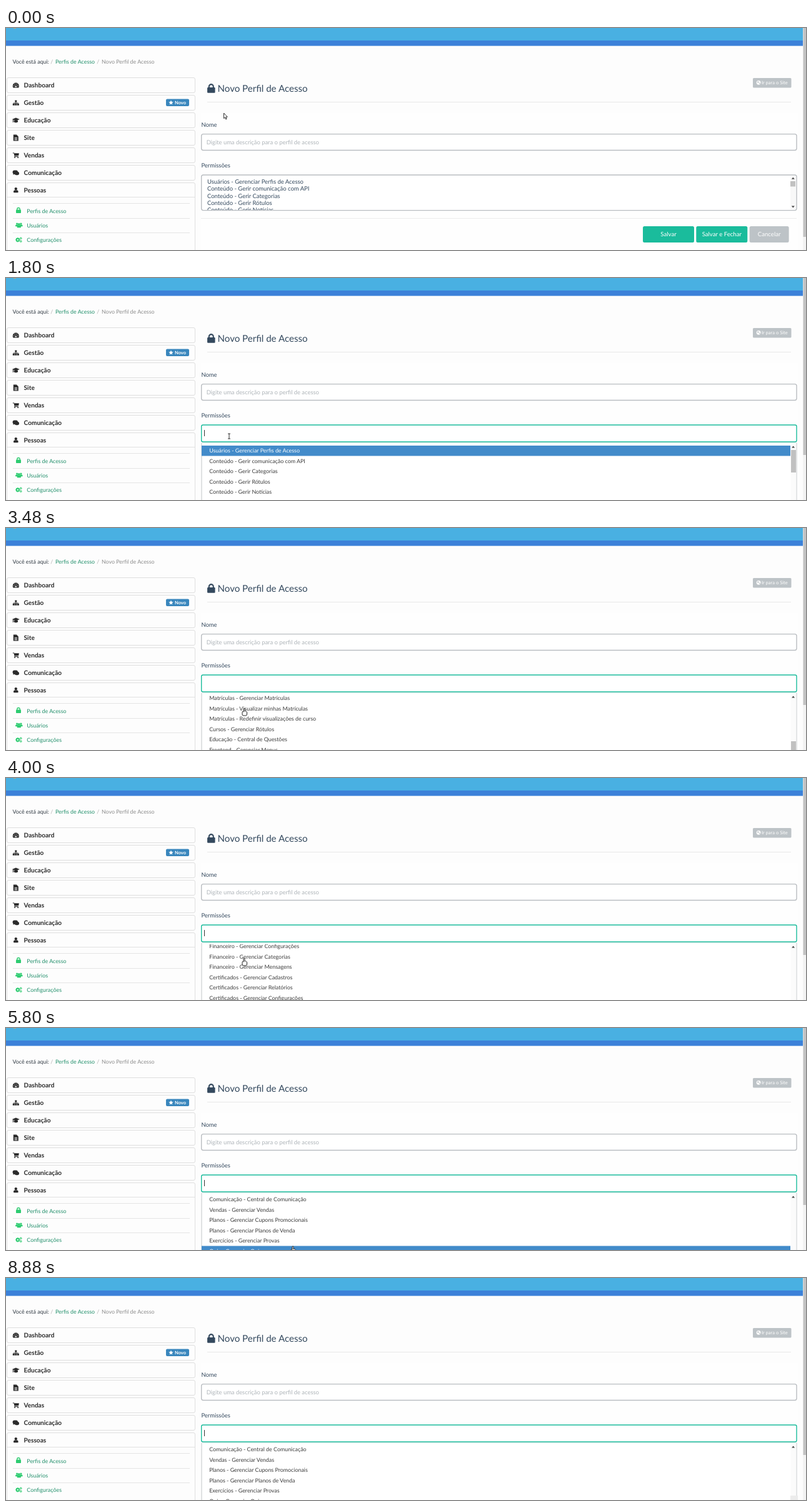
An HTML page with a canvas for the animation above (9290 ms loop, 1280x355 px).

```html
<!DOCTYPE html>
<html lang="pt">
<head>
<meta charset="utf-8">
<style>
html, body { margin: 0; width: 100%; height: 100%; overflow: hidden; background: #fdfdfd; }
canvas { display: block; }
</style>
</head>
<body>
<canvas id="stage" width="1280" height="355"></canvas>
<script>
const ctx = document.getElementById('stage').getContext('2d');
const LOOP = 9290, ROW = 16.5, LIST_TOP = 268, END_SCROLL = 942.5;
const CONVERTED = 270, OPENED = 1650, HOVERED = 2210, SCROLLED = 4280, RESUMED = 4730, LEFT = 7890;
const PAPER = '#fdfdfd', DARK = '#2b2b2b', NAVY = '#34495e', GREEN = '#23906c';
const LIME = '#2ecc71', TEAL = '#1abc9c', GRAY = '#bdc3c7', BORDER = '#b9bdc1', THUMB = '#c1c1c1';

// Each pointer move starts where the previous one ended.
const moves = [
  { from: 540, to: 1800, x: 357, y: 253 },
  { from: 1800, to: 2210, x: 381, y: 288.5 },
  { from: 4280, to: 4590, x: 438, y: 305 },
  { from: 5200, to: 5800, x: 459, y: 349 },
  { from: 6130, to: 6330, x: 462, y: 385 },
  { from: 7000, to: 7340, x: 1240, y: 349 },
  { from: 7420, to: LEFT, x: 1268, y: 390 }
];

function buildPermissions() {
  const list = ['Usuários - Gerenciar Perfis de Acesso', 'Conteúdo - Gerir comunicação com API'];
  for (const item of ['Categorias', 'Rótulos', 'Notícias', 'Páginas', 'Banners', 'Eventos', 'Galerias', 'Arquivos'])
    list.push('Conteúdo - Gerir ' + item);
  const items = ['Cadastros', 'Relatórios', 'Configurações', 'Categorias', 'Mensagens'];
  const fill = (areas, count) => {
    for (let i = 0; i < count; i++) list.push(areas[Math.floor(i / 5)] + ' - Gerenciar ' + items[i % 5]);
  };
  fill(['Usuários', 'Cursos', 'Turmas'], 14);
  list.push('Matrículas - Gerenciar Matrículas', 'Matrículas - Visualizar minhas Matrículas',
    'Matrículas - Redefinir visualizações de curso', 'Cursos - Gerenciar Rótulos',
    'Educação - Central de Questões', 'Frontend - Gerenciar Menus');
  fill(['Frontend', 'Site', 'Financeiro', 'Certificados', 'Alunos', 'Fóruns'], 27);
  list.push('Comunicação - Central de Comunicação', 'Vendas - Gerenciar Vendas',
    'Planos - Gerenciar Cupons Promocionais', 'Planos - Gerenciar Planos de Venda',
    'Exercícios - Gerenciar Provas', 'Quiz - Gerenciar Quizzes');
  return list;
}
const permissions = buildPermissions();

const progress = (t, from, to) => Math.min(1, Math.max(0, (t - from) / (to - from)));
const smooth = k => k * k * (3 - 2 * k);

function pointerAt(t) {
  let x = 348.5, y = 136;
  for (const move of moves) {
    const k = smooth(progress(t, move.from, move.to));
    x += (move.x - x) * k;
    y += (move.y - y) * k;
  }
  return [x, y];
}

// Two turns of the wheel, 100 px per notch.
function scrollAt(t) {
  const notches = Math.floor(4 * progress(t, 2470, 3350)) + Math.floor(6 * progress(t, 3500, SCROLLED));
  return Math.min(END_SCROLL, 100 * notches);
}

function activeRow(t, x, y, scroll) {
  if (t >= HOVERED && t < SCROLLED) return 1;
  if (t < RESUMED) return Math.floor(scroll / ROW);
  return x < 1255 && y < 365 ? Math.floor((y - LIST_TOP + scroll) / ROW) : -1;
}

function text(str, x, centerY, size, color, weight = 400, align = 'left') {
  ctx.font = `${weight} ${size}px Lato, sans-serif`;
  ctx.textAlign = align;
  ctx.fillStyle = color;
  ctx.fillText(str, x, centerY + size * 0.36);
}
function rect(x, y, w, h, color) {
  ctx.fillStyle = color;
  ctx.fillRect(x, y, w, h);
}
function box(x, y, w, h, r, fill, stroke, line = 1) {
  ctx.beginPath();
  ctx.roundRect(x, y, w, h, r);
  paint(fill, stroke, line);
}
function paint(fill, stroke, line = 1) {
  if (fill) { ctx.fillStyle = fill; ctx.fill(); }
  if (stroke) { ctx.strokeStyle = stroke; ctx.lineWidth = line; ctx.stroke(); }
}
function dot(x, y, r, color) {
  ctx.beginPath();
  ctx.arc(x, y, r, 0, Math.PI * 2);
  paint(color);
}
function ring(x, y, r, line, color, from = 0) {
  ctx.beginPath();
  ctx.arc(x, y, r, from, Math.PI * 2);
  paint(null, color, line);
}
function poly(points, fill, stroke) {
  ctx.beginPath();
  points.forEach(([x, y]) => ctx.lineTo(x, y));
  ctx.closePath();
  paint(fill, stroke);
}
function clipped(x, y, w, h, content) {
  ctx.save();
  ctx.beginPath();
  ctx.rect(x, y, w, h);
  ctx.clip();
  content();
  ctx.restore();
}
function at(x, y, scale, content) {
  ctx.save();
  ctx.translate(x, y);
  ctx.scale(scale, scale);
  content();
  ctx.restore();
}
function triangle(x, y, dir) {
  poly([[x - 2.5, y + 1.2 * dir], [x + 2.5, y + 1.2 * dir], [x, y - 1.8 * dir]], '#444');
}

// Icons are drawn around the origin.
const lock = color => {
  box(-5, -1, 10, 7, 1, color);
  ring(0, -2, 2.8, 1.8, color, Math.PI);
  for (const x of [-2.8, 2.8]) rect(x - 0.9, -2, 1.8, 2, color);
};
const person = color => {
  dot(0, -2.2, 2.2, color);
  box(-3.8, 0, 7.6, 4, [2.5, 2.5, 1, 1], color);
};
const gear = color => {
  for (let a = 0; a < 8; a++) dot(3 * Math.cos(a * Math.PI / 4), 3 * Math.sin(a * Math.PI / 4), 0.9, color);
  ring(0, 0, 2.1, 1.8, color);
};
const star = color => poly(Array.from({ length: 10 }, (_, i) => {
  const a = i * Math.PI / 5 - Math.PI / 2, r = i % 2 ? 1.8 : 3.9;
  return [r * Math.cos(a), r * Math.sin(a)];
}), color);
const globe = () => {
  dot(0, 0, 3.4, '#fff');
  dot(-0.9, -0.8, 1.2, GRAY);
  dot(1.6, 1.2, 0.9, GRAY);
};
const gauge = () => {
  box(-5, -4, 10, 8, [5, 5, 1.5, 1.5], DARK);
  for (let i = 0; i < 4; i++) dot(-3 * Math.cos(i * Math.PI / 3), 1 - 3.2 * Math.sin(i * Math.PI / 3), 0.7, PAPER);
  dot(0, 1.8, 1.2, PAPER);
};
const sitemap = () => {
  rect(-1.5, -4, 3, 3, DARK);
  rect(-0.5, -1, 1, 2.2, DARK);
  rect(-4, 0, 8, 1, DARK);
  for (let x = -5; x < 5; x += 3.5) rect(x, 1.2, 3, 3, DARK);
};
const cap = () => {
  poly([[-6, -1.5], [0, -4], [6, -1.5], [0, 1]], DARK);
  box(-3.2, 0.3, 6.4, 3.4, [0, 0, 2, 2], DARK);
  rect(-5, -1, 1, 4.5, DARK);
};
const sheet = () => {
  poly([[-4, -5], [1, -5], [4, -2], [4, 5], [-4, 5]], DARK);
  for (let y = -0.4; y < 4; y += 1.7) rect(-2.2, y, 4.4, 0.8, PAPER);
};
const cart = () => {
  rect(-5, -4, 2.4, 1, DARK);
  poly([[-3.3, -3.2], [5, -3.2], [4.4, 0.5], [-2.4, 1.2]], DARK);
  rect(-2.5, 1.5, 6.5, 1, DARK);
  for (const x of [-1.7, 3.3]) dot(x, 3.6, 1, DARK);
};
const chat = () => {
  box(-2, -1.5, 7.2, 5.4, 2.7, DARK);
  box(-5.2, -3.8, 8.4, 5.8, 2.9, DARK);
  poly([[-4, 1], [-4.4, 3.4], [-1, 1.8]], DARK);
};
const menu = { Dashboard: gauge, Gestão: sitemap, Educação: cap, Site: sheet, Vendas: cart,
  Comunicação: chat, Pessoas: () => person(DARK) };

function drawSidebar() {
  Object.entries(menu).forEach(([label, icon], i) => {
    const y = 91.3 + 27.95 * i, height = label === 'Pessoas' ? 140 : 24;
    box(1.5, Math.round(y - 12) + 0.5, 301, height, 2.5, PAPER, '#dedede');
    at(15.8, y + 0.3, 1, icon);
    text(label, 28.6, y, 10.1, DARK, 700);
  });
  rect(2, 270, 300, 1, '#e2e2e2');
  box(256, 113.5, 37, 11.5, 2, '#3a87bd');
  at(264, 119.4, 1, () => star('#fff'));
  text('Novo', 270, 119.3, 7.5, '#fff', 700);

  ['Perfis de Acesso', 'Usuários', 'Configurações'].forEach((label, i) => {
    const y = 292.3 + 23.2 * i;
    rect(11, Math.round(y - 12), 283, 1, '#e4e4e4');
    text(label, 33.3, y, 8.9, GREEN);
  });
  at(20, 291.3, 0.8, () => lock(LIME));
  for (const dx of [-3.2, 3.2, 0]) at(20.8 + dx, dx ? 314.5 : 315.8, dx ? 0.7 : 0.85, () => person(LIME));
  at(18.8, 338.7, 0.95, () => gear(LIME));
  for (const dy of [-2.4, 2.4]) at(23.8, 338.7 + dy, 0.5, () => gear(LIME));
}

function drawHeader() {
  rect(0, 0, 1275, 20, '#49b0e2');
  rect(0, 20, 1275, 8.6, '#3c81d9');
  rect(12, 0, 4, 1, '#b9a57c');
  text('Você está aqui:', 10.4, 53.8, 8.85, '#333c45');
  text('/', 71.3, 53.8, 8.85, '#aaa');
  text('Perfis de Acesso', 79, 53.8, 8.85, GREEN);
  text('/', 145.3, 53.8, 8.85, '#aaa');
  text('Novo Perfil de Acesso', 153, 53.8, 8.85, '#8c8c8c');

  at(328.3, 96.2, 1.25, () => lock(NAVY));
  text('Novo Perfil de Acesso', 338.6, 97, 15.05, NAVY);
  rect(322, 118, 934, 1, '#e8e8e8');
  box(1195, 80, 61.5, 15.5, 1.5, GRAY);
  at(1204.2, 87.3, 1, globe);
  text('Ir para o Site', 1209, 87.6, 7.55, '#fff');
}

function drawNativeList() {
  box(312.7, 235, 952.3, 56.6, 3, '#fff', BORDER, 1.4);
  clipped(314, 236, 950, 55, () => {
    for (let i = 0; i < 5; i++) text(permissions[i], 322, 245.4 + 11.4 * i, 9.45, NAVY);
  });
  rect(1255, 237, 8.5, 53, '#f8f8f8');
  rect(1255, 245, 8, 8.5, THUMB);
  triangle(1259.3, 240.5, 1);
  triangle(1259.3, 285.8, -1);
}

function drawForm(t) {
  const converted = t >= CONVERTED, dy = converted ? -30 : 0;
  text('Nome', 312.4, 154.6, 9.45, NAVY);
  box(312.7, 169.6, 952.3, 25.9, 3, '#fff', BORDER, 1.4);
  text('Digite uma descrição para o perfil de acesso', 320.8, 182.4, 9.4, '#aeb4b9');
  text('Permissões', 312.4, 219.6, 9.45, NAVY);
  if (converted) box(312.7, 235, 952.3, 27, 2.5, '#fff', t >= OPENED ? TEAL : BORDER, 1.4);
  else drawNativeList();

  rect(312, 304 + dy, 953, 1, '#ececec');
  ['Salvar', 'Salvar e Fechar', 'Cancelar'].forEach((label, i) => {
    const x = 1019 + 85.3 * i, w = i < 2 ? 82 : 63;
    box(x, 317 + dy, w, 26, 2.5, i < 2 ? TEAL : GRAY);
    text(label, x + w / 2, 329.7 + dy, 9.6, '#fff', 400, 'center');
  });
}

function drawDropdown(t, scroll, active) {
  rect(313, 263, 952.5, 92, '#fff');
  rect(313, 263, 952.5, 1, '#ececec');
  for (const x of [312.5, 1264.5]) rect(x, 264, 1, 91, '#c2c6c8');
  clipped(313, 266, 951.5, 89, () => {
    permissions.forEach((label, i) => {
      const y = LIST_TOP + i * ROW - scroll;
      if (i === active) rect(313, y, 942, ROW, '#428bca');
      text(label, 325.2, y + 8, 8.9, i === active ? '#fff' : '#3c3c3c');
    });
    rect(1255.5, 266, 9, 89, '#fbfbfb');
    rect(1256, 275 + scroll * 0.165, 8, 36, THUMB);
    triangle(1259.6, 270.3, 1);
  });
  if (t >= LEFT) rect(1255, 348, 12, 7, '#ececec');
  if (Math.floor((t - 1455) / 530) % 2 === 0) rect(317, 243, 1, 10, '#333');
}

const hand = () => {
  box(-3, 4.5, 7.5, 7, 2, '#fff', '#222');
  box(-1, 0, 2, 6, 1, '#fff', '#222');
  rect(-0.5, 5, 4, 3, '#fff');
};
const beam = () => {
  rect(-0.5, -4, 1, 8, '#333');
  for (const y of [-4.5, 3.5]) rect(-2, y, 4, 1, '#333');
};
const arrow = () =>
  poly([[0, 0], [0, 8.6], [2, 6.9], [3.3, 10], [4.6, 9.4], [3.3, 6.3], [5.8, 6.2]], '#fff', '#333');

function pointerShape(x, y, open) {
  if (open && y > 266 && x < 1255) return hand;
  const overField = (y > 169 && y < 196) || (y > 235 && y < 262);
  return overField ? beam : arrow;
}

function draw(t) {
  const [x, y] = pointerAt(t), scroll = scrollAt(t), open = t >= OPENED;
  rect(0, 0, 1280, 355, PAPER);
  drawHeader();
  drawSidebar();
  rect(312, 136, 955, 219, '#fefefe');
  drawForm(t);
  if (open) drawDropdown(t, scroll, activeRow(t, x, y, scroll));
  rect(1275, 0, 5, 355, '#f3f3f3');
  rect(1275.5, 0, 4.5, t < CONVERTED ? 334 : 283, '#c3c3c3');
  at(x, y, 1, pointerShape(x, y, open));
}

ctx.textRendering = 'geometricPrecision';
function frame() {
  draw(performance.now() % LOOP);
  requestAnimationFrame(frame);
}
frame();
</script>
</body>
</html>
```
